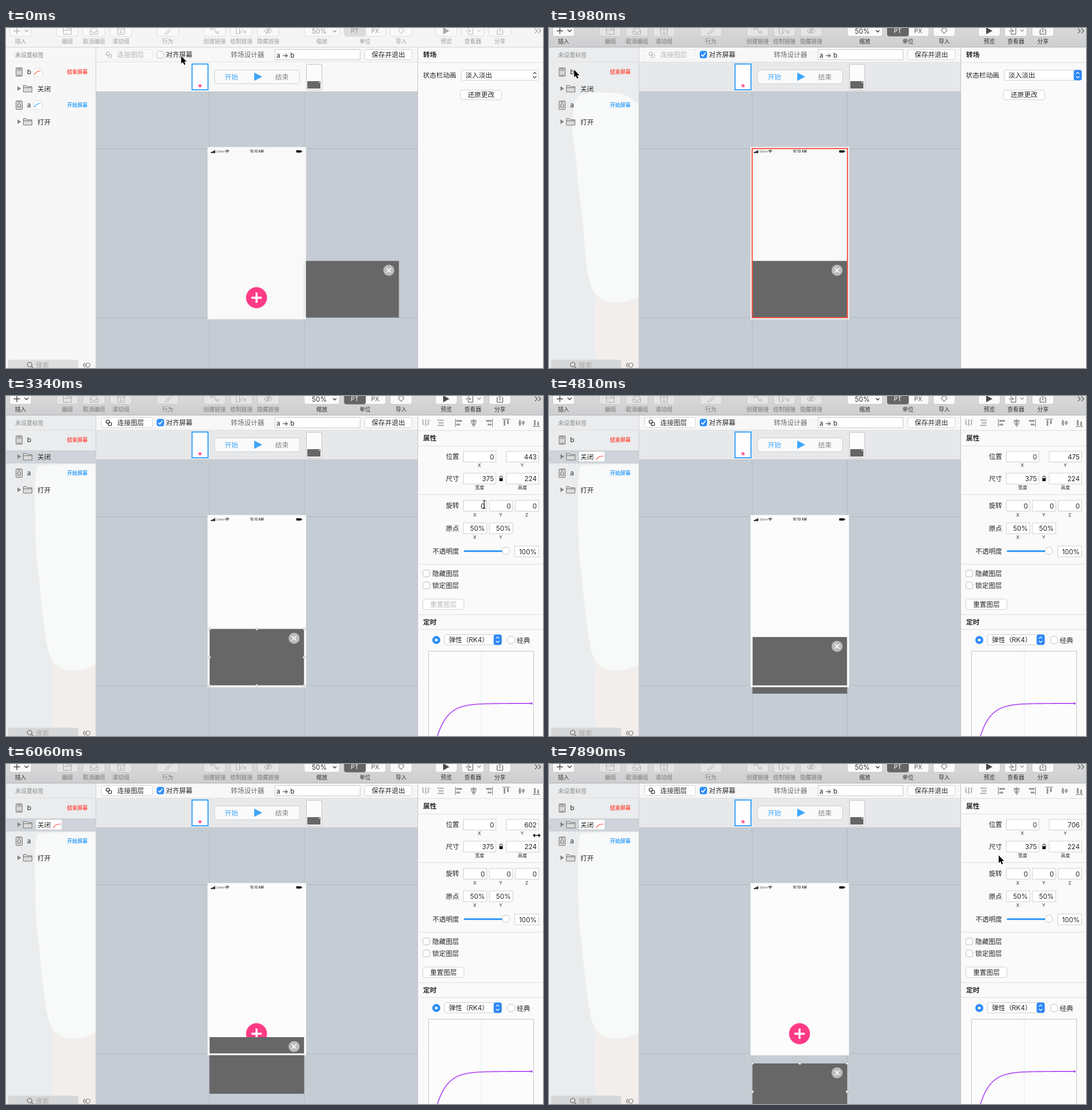
An HTML page with a canvas for the animation above (8 s loop, 941 by 595 pixels).

```html
<!DOCTYPE html>
<html lang="zh-CN">
<head>
<meta charset="utf-8">
<title>转场设计器</title>
<style>
html, body { margin: 0; width: 100%; height: 100%; overflow: hidden; }
canvas { display: block; width: 941px; height: 595px; }
</style>
</head>
<body>
<canvas id="stage" width="941" height="595"></canvas>
<script>
const g = document.getElementById('stage').getContext('2d');
const LOOP = 8000;
const BLUE = '#3ea6fb', RED = '#fb5a4b', PINK = '#ff3b86', PANE = '#676767', INK = '#262626';

// Start, end and number of evenly spaced picture changes
const bursts = [[0, 0, 1], [150, 150, 1], [470, 470, 1], [920, 1830, 7], [1980, 2280, 3],
  [2570, 3340, 6], [3640, 4670, 8], [4810, 5770, 7], [5920, 6860, 7], [7000, 7890, 7]];
const ticks = bursts.flatMap(([a, b, n]) =>
  Array.from({ length: n }, (_, i) => n > 1 ? Math.round(a + (b - a) * i / (n - 1)) : a));

const pointerKeys = [[0, 307, 49], [150, 307, 48], [470, 307, 47.5], [920, 307, 46], [1070, 307, 46],
  [1830, 60, 78], [1980, 44, 73], [2280, 62, 103], [2570, 62, 103], [3340, 838, 190],
  [3640, 838, 190], [4390, 930, 125], [7000, 930, 125], [7890, 788, 160]];
const layerKeys = [[4670, 443], [4810, 475], [5770, 580], [6060, 622], [6860, 706]];

function at(keys, t) {
  const i = keys.findIndex(k => k[0] > t);
  if (i < 0) return keys[keys.length - 1].slice(1);
  if (i === 0) return keys[0].slice(1);
  const a = keys[i - 1], b = keys[i], p = (t - a[0]) / (b[0] - a[0]);
  return a.slice(1).map((v, n) => v + (b[n + 1] - v) * p);
}

function text(s, x, y, size = 11.7, color = INK, align = 'left', weight = 400) {
  g.font = `${weight} ${size}px Inter, "Noto Sans CJK SC", "Noto Sans CJK", sans-serif`;
  g.fillStyle = color;
  g.textAlign = align;
  g.fillText(s, x, y + size * .37);
}
function rect(x, y, w, h, fill) { g.fillStyle = fill; g.fillRect(x, y, w, h); }
function box(x, y, w, h, r, fill, stroke) {
  g.beginPath();
  g.roundRect(x + .5, y + .5, w - 1, h - 1, r);
  if (fill) { g.fillStyle = fill; g.fill(); }
  if (stroke) { g.strokeStyle = stroke; g.lineWidth = 1; g.stroke(); }
}
function disc(x, y, r, fill, stroke) {
  g.beginPath();
  g.arc(x, y, r, 0, 7);
  g.fillStyle = fill; g.fill();
  if (stroke) { g.strokeStyle = stroke; g.lineWidth = 1; g.stroke(); }
}
function path(d, x, y, stroke, width = 1, fill) {
  const p = new Path2D(d);
  g.save();
  g.translate(x, y);
  if (fill) { g.fillStyle = fill; g.fill(p); }
  if (stroke) { g.strokeStyle = stroke; g.lineWidth = width; g.stroke(p); }
  g.restore();
}
function button(label, x, y, w, h, color = INK) {
  box(x, y, w, h, 3.5, '#fff', '#d2d2d2');
  text(label, x + w / 2, y + h / 2, 11.7, color, 'center');
}
function checkbox(x, y, on, pressed) {
  box(x, y, 13, 13, 3, on ? '#2f8ffb' : pressed ? '#e6e6e6' : '#fff', on ? '#2f8ffb' : pressed ? '#9c9c9c' : '#bdbdbd');
  if (on) path('M3 6.5l2.6 3L10 3.4', x, y, '#fff', 1.7);
}
function select(label, x, y, w, on, inset) {
  box(x, y, w, 19, 3.5, '#fff', '#cfcfcf');
  if (on) box(x + w - 15, y, 15, 19, 3.5, '#2b87f8');
  path('M-3 -2l3 -3 3 3M-3 2l3 3 3 -3', x + w - 7.5, y + 9.5, on ? '#fff' : '#444', 1.2);
  text(label, x + inset, y + 9.3);
}
function field(value, x, y, w) {
  box(x, y, w, 20, 0, '#fff', '#d0d0d0');
  text(value, x + w - 4, y + 10.5, 11.7, INK, 'right');
}

const glyphs = {
  plus: 'M-12 0h11M-6.5-5.5v11M7-2l3.5 3.5L14-2',
  folder: 'M-7-6h5l2 2h7V6H-7ZM-7-1H7',
  tray: 'M-7 6V1l3-6h8l3 6v5ZM-7 1h4l1 2h4l1-2h4',
  scroll: 'M-6-6H6V6H-6ZM-6-3H6M-2 2l2 2 2-2M0-1v5',
  wand: 'M-6 6L2-2l2 2-8 8M3-6v2M7-3H5',
  link: 'M-7-4a2 2 0 1 0 4 0a2 2 0 1 0-4 0M-3-4h2c4 0 0 7 4 7M3 3a2 2 0 1 0 4 0a2 2 0 1 0-4 0',
  draw: 'M-9-6h6V5h-6ZM-3 3c5 0 1-5 6-5M4 2a2 2 0 1 0 4 0a2 2 0 1 0-4 0',
  hide: 'M-7 0q7-8 14 0q-7 8-14 0M-2 0a2 2 0 1 0 4 0a2 2 0 1 0-4 0M5-6L-5 6',
  gem: 'M-5-1l3-4h4l3 4-5 6Z',
  viewer: 'M-8-2v-4h8V6h-8V2M-12 0h8M-6-2l2 2-2 2M8-2l3 3 3-3',
  share: 'M-3-2h-2v8H5v-8H3M0 3v-9M-3-4l3-3 3 3'
};

// label, glyph, left edge, width, dimmed
const tools = [['插入', 'plus', 6, 39], ['编组', 'folder', 88, 39, 1], ['取消编组', 'tray', 134, 40, 1],
  ['滚动组', 'scroll', 182, 39, 1], ['行为', 'wand', 264, 39, 1], ['创建链接', 'link', 346, 39, 1],
  ['绘制链接', 'draw', 393, 39, 1], ['隐藏链接', 'hide', 440, 39, 1], ['缩放', '', 522, 63],
  ['单位', '', 592, 74], ['导入', 'gem', 673, 39], ['预览', '', 752, 39], ['查看器', 'viewer', 798, 40],
  ['分享', 'share', 846, 39]];

function toolbar(active) {
  if (active) {
    const shade = g.createLinearGradient(0, 0, 0, 33);
    shade.addColorStop(0, '#d9d9da');
    shade.addColorStop(1, '#cdced0');
    rect(0, 0, 941, 33, shade);
  } else rect(0, 0, 941, 33, '#f5f5f5');
  rect(0, 33, 941, 1, active ? '#b4b4b5' : '#d3d3d3');
  for (const [label, glyph, x, w, dim] of tools) {
    const color = active ? (dim ? '#777' : '#333') : '#9d9d9d';
    const line = active ? (dim ? '#a9a9a9' : '#4a4a4a') : '#b4b4b4';
    box(x, -8, w, 23, 4, active ? (dim ? '#e5e5e6' : '#fafafa') : '#f9f9f9', active ? '#c6c6c6' : '#dedede');
    if (glyph) path(glyphs[glyph], x + w / 2, 5, line, glyph === 'plus' ? 1.4 : 1);
    text(label, x + w / 2, 23, 9.8, color, 'center');
  }
  const ink = active ? '#333' : '#9a9a9a';
  text('50%', 549, 5.5, 11.7, ink, 'center');
  path('M-3-2l3 3 3-3', 576, 6, ink, 1.3);
  box(592, -8, 39, 23, 4, active ? '#656565' : '#dcdcdc');
  text('PT', 611, 5.5, 10.5, active ? '#fff' : '#8c8c8c', 'center');
  text('PX', 647, 5.5, 10.5, active ? '#555' : '#a0a0a0', 'center');
  path('M-5-6L6 0-5 6Z', 771, 5, null, 0, active ? '#4a4a4a' : '#a8a8a8');
  path('M-5-4l4 4-4 4M1-4l4 4-4 4', 932, 5, active ? '#555' : '#999', 1.1);
}

function curveTag(x, y, color) {
  box(x, y, 16, 16, 2, '#fff', '#dcdcdc');
  path('M2 12q2-7 11-7', x, y, color, 1.2);
}
function folderRow(label, y) {
  path('M20 -4l6.5 4-6.5 4Z', 0, y, null, 0, '#858585');
  path('M30.5 6V-5.5h5l1.5 2h8.5V6ZM30.5-1.5h15', 0, y, '#747474', 1, '#dcdcdc');
  text(label, 55, y + .5);
}
function screenRow(name, note, y, color, home) {
  box(17, y - 8, 12, 16, 1.5, '#d5d5d5', '#777');
  path(home ? 'M19.5 0L23-3l3.5 3M20.5 0v3.5h5V0M20-5.5h6' : 'M19-5.5h8M19-3h8M19 5.5h8', 0, y, '#777', 1);
  text(name, 37, y, 11.7, '#444', 'left', 500);
  text(note, 143, y, 9, color, 'right', 700);
}
function sidebar(active, selected, edited) {
  rect(0, 34, 158, 561, active ? '#eaecee' : '#f7f7f7');
  if (active) {
    rect(80, 465, 78, 130, '#f2eeeb');
    path(selected
      ? 'M158 120C130 118 80 120 56 122Q49 130 51 200Q51 290 58 320Q64 400 75 450Q85 478 115 481Q140 481 158 469Z'
      : 'M158 134Q138 116 120 114C90 112 65 112 50 120Q41 130 41 185Q49 230 50 270Q60 330 62 380Q66 430 75 455Q85 478 115 481Q140 480 158 469Z',
      0, 0, null, 0, '#f8f9f9');
  }
  text('未设置标签', 16, 47, 10, '#a9a9a9', 'left', 600);
  rect(0, 59, 158, 1, active ? '#e0e1e3' : '#efefef');
  if (selected) rect(0, 95, 158, 23, '#ced4d9');
  if (edited) {
    box(52, 97, 46, 18, 2, '#fff', '#e2e2e2');
    path('M83 112q2-7 13-7', 0, 0, RED, 1.2);
  }
  screenRow('b', '结束屏幕', 77, RED);
  folderRow('关闭', 106);
  screenRow('a', '开始屏幕', 135, BLUE, true);
  folderRow('打开', 164);
  if (!active) {
    curveTag(48, 70, RED);
    curveTag(48, 127, BLUE);
  }
  box(3, 580, 124, 24, 4, active ? '#d6d7d8' : '#dedede');
  path('M37.5 589a4 4 0 1 0 8 0a4 4 0 1 0-8 0M44.5 592l3.5 4', 0, 0, '#666', 1.2);
  text('搜索', 52, 590, 11.7, '#a9a9a9');
  disc(143.5, 590, 3.7, '#f4f4f4', '#666');
  path('M139 586.5a3.5 3.5 0 1 0 0 7M137 590h4', 0, 0, '#666', 1);
  rect(157, 34, 1, 561, '#cdced0');
}

function controls(t, selected) {
  const checked = t >= 1070;
  rect(158, 34, 563, 26, '#f7f7f8');
  rect(158, 60, 563, 51, checked ? '#e6e8ea' : '#f8f8f8');
  rect(158, 59, 563, 1, '#e2e3e5');
  rect(158, 111, 563, 1, '#c0c3c8');
  box(167, 37, 90, 19, 3.5, selected ? '#fff' : '#f8f8f8', selected ? '#d2d2d2' : '#ececec');
  const ink = selected ? INK : '#b5b5b5';
  path('M175.5 45a3 3 0 1 0 6 0a3 3 0 1 0-6 0M179 49a3 3 0 1 0 6 0a3 3 0 1 0-6 0', 0, 0, ink, 1.2);
  text('连接图层', 195, 46.5, 11.7, ink);
  checkbox(264, 40, checked, t >= 920);
  text('对齐屏幕', 280, 47);
  text('转场设计器', 394, 46.5, 11.7, '#6a6a6a', 'left', 500);
  box(471, 37, 150, 19, 0, '#fff', '#c9c9c9');
  text('a → b', 474, 47.5);
  button('保存并退出', 628, 37, 84, 19);

  box(325, 62, 30, 47, 1, '#fdfdfd');
  g.strokeStyle = BLUE; g.lineWidth = 2;
  g.strokeRect(326, 63, 28, 45);
  disc(340, 101, 2.6, PINK);
  rect(339, 100.5, 2, 1, '#fff');
  box(526, 63, 28, 46, 1, '#fcfcfc', '#bfc1c4');
  rect(528, 93, 23, 13, PANE);
  rect(548, 94, 2, 2, '#ddd');
  box(365, 73, 150, 25, 4, '#fafafa', '#cfd1d3');
  text('开始', 395, 85.5, 11.7, BLUE, 'center');
  path('M435 78L449 85.3 435 92.5Z', 0, 0, null, 0, BLUE);
  text('结束', 483.5, 85.5, 11.7, '#858585', 'center');
}

function workspace(t, selected, layerY) {
  rect(158, 111, 563, 484, '#c6ccd4');
  for (const x of [355.5, 522]) rect(x, 111, 1, 484, '#b4b9c1');
  for (const y of [210.5, 506.5]) rect(158, y, 563, 1, '#b4b9c1');
  const paper = selected ? '#fcfcfc' : '#f9f9f9';
  rect(353.5, 208.5, 172, 301, paper);
  const x = t >= 920 ? 356.5 : 522.5, y = 407.6 + (layerY - 443) * .4427, w = 166, h = 99.1;
  disc(439, 472, 18.4, PINK);
  path('M430 472h18M439 463v18', 0, 0, '#fff', 3.6);
  rect(x, y, w, h, PANE);
  disc(x + 148.3, y + 16.4, 9.7, '#bcbcbc');
  path('M-4-4l8 8M4-4l-8 8', x + 148.3, y + 16.4, '#fff', 1.6);
  g.strokeStyle = paper; g.lineWidth = 3;
  g.strokeRect(355, 210, 169, 298);
  if (t >= 1980 && t < 2280) {
    g.strokeStyle = '#f8594a'; g.lineWidth = 2;
    g.strokeRect(356, 211, 167, 296);
  }
  for (let i = 0; i < 4; i++) rect(359 + i * 2, 217 - i, 1.6, 2 + i, '#111');
  text('Ostrin', 368.5, 216.3, 5.4, '#555');
  path('M384.6 215.3q3.1-2.8 6.2 0M385.9 216.8q1.8-1.6 3.6 0M387.2 218.2h1', 0, 0, '#111', 1.1);
  text('10:10 AM', 439.5, 216.3, 5.6, '#111', 'center', 500);
  box(508, 213.5, 10, 5, 1, '#111');
  rect(518, 215, 1, 2, '#111');
  if (selected && (t < 4810 || t >= 7000))
    for (const i of [0, 1, 2]) for (const j of [0, 1, 2])
      if (i !== 1 || j !== 1) disc(x + i * w / 2, y + j * h / 2, 2, '#fff', '#b0b0b0');
}

function transitionPanel(active) {
  text('转场', 731, 47, 11.7, INK, 'left', 600);
  rect(722, 60, 219, 1, '#dedede');
  text('状态栏动画', 789, 83, 11.7, INK, 'right');
  select('淡入淡出', 797, 73, 137, active, 8);
  button('还原更改', 796, 108, 73, 18);
}

function alignIcons() {
  path('M730.5 41v6q0 3 2 3M735.5 41v12M740.5 41v6q0 3-2 3M756 42.5h11M758 47h9M756 51.5h11', 0, 0, '#aaa', 1.8);
  path('M787.5 40v14M814 47h11M819.5 40v14M852.5 40v14M870 40.5h13M897 47h13M923 53.5h13', 0, 0, '#777', 1);
  const bars = 'M0 43.5h10M0 50h7';
  path(bars, 789, 0, '#999', 3);
  path('M0 43.5h10M2 50h6', 814.5, 0, '#999', 3);
  path('M0 43.5h10M3 50h7', 841, 0, '#999', 3);
  path('M3 42v10M9 42v7', 870.5, 0, '#999', 3);
  path('M3 42v10M9 43.5v7', 897.5, 0, '#999', 3);
  path('M3 42v10M9 45v7', 923.5, 0, '#999', 3);
}
function propertyPanel(layerY, edited) {
  alignIcons();
  for (const y of [60, 87, 172, 294, 382, 408]) rect(722, y, 219, 1, '#dedede');
  text('属性', 731, 74, 11.7, INK, 'left', 600);
  text('定时', 731, 396, 11.7, INK, 'left', 600);
  [['位置', 106], ['尺寸', 145], ['旋转', 192], ['原点', 231.5], ['不透明度', 272]]
    .forEach(([s, y]) => text(s, 794, y, 11.7, INK, 'right'));
  const caption = (s, x, y) => text(s, x, y, 8, INK, 'center');
  field('0', 801, 96, 58);
  field(String(layerY), 876, 96, 58);
  caption('X', 829.5, 121); caption('Y', 904.5, 121);
  field('375', 801, 134.5, 58);
  field('224', 876, 134.5, 58);
  caption('宽度', 830, 160); caption('高度', 905, 160);
  rect(864.5, 144, 6, 5, '#111');
  path('M865.5 144v-2a2 2 0 0 1 4 0v2', 0, 0, '#111', 1);
  ['X', 'Y', 'Z'].forEach((axis, i) => {
    const x = 801 + i * 45.5;
    field('0', x, 182, 42);
    caption(axis, x + 20.5, 208);
    if (i < 2) {
      field('50%', x, 221.5, 42);
      caption(axis, x + 20.5, 247);
    }
  });
  box(802, 270, 75, 3, 1.5, BLUE, '#2f90f5');
  disc(876, 271, 6.5, '#fff', '#c4c4c4');
  field('100%', 891, 262, 43);
  checkbox(730, 304, false);
  text('隐藏图层', 747, 310.5);
  checkbox(730, 325, false);
  text('锁定图层', 747, 331.5);
  button('重置图层', 730, 355, 73, 19, edited ? INK : '#b8b8b8');
  disc(754, 427, 7, '#2b8cfa');
  disc(754, 427, 2.5, '#fff');
  select('弹性（RK4）', 768, 417, 101, true, 8);
  disc(885, 427, 6.8, '#fff', '#c0c0c0');
  text('经典', 895, 427.5);
  box(740, 446, 185, 170, 0, '#fcfcfc', '#c4c4c4');
  rect(832.5, 447, 1, 148, '#d8edfa');
  g.beginPath();
  for (let x = 750; x <= 921; x++) g.lineTo(x, 538 + 57 * Math.exp((756 - x) / 18.7));
  g.strokeStyle = '#b75cf5'; g.lineWidth = 1.9; g.stroke();
  disc(921, 538, 1.9, '#b04ff0');
}

function pointer(t) {
  if (t >= 4670 && t < 5920) return;
  const [x, y] = at(pointerKeys, t);
  if (t >= 3340 && t < 3700) {
    path('M-2.5-7q2.5 0 2.5 2q0-2 2.5-2M0-5v11M-2.5 7q2.5 0 2.5-2q0 2 2.5 2', x, y, '#222', 1.2);
  } else if (t >= 4390 && t <= 7000) {
    const arrows = 'M-7 0l4-3.5v2.7h6v-2.7l4 3.5-4 3.5V.8h-6v2.7Z';
    path(arrows, x, y, '#fff', 1.5, '#111');
    path(arrows, x, y, null, 0, '#111');
  } else {
    const arrow = 'M0 0v13.3l3-2.7 2.2 5 2.3-1-2.2-4.8h4.2Z';
    path(arrow, x, y, '#fff', 1.6, '#000');
    path(arrow, x, y, null, 0, '#000');
  }
}

function draw(now) {
  const time = now % LOOP;
  const t = ticks.filter(k => k <= time).pop();
  const active = t >= 920, selected = t >= 2570, edited = t >= 4810;
  const layerY = Math.round(at(layerKeys, t)[0]);
  workspace(t, selected, layerY);
  controls(t, selected);
  sidebar(active, selected, edited);
  rect(721, 34, 220, 561, '#fafafa');
  rect(721, 34, 1, 561, '#c3c4c6');
  if (selected) propertyPanel(layerY, edited); else transitionPanel(active);
  toolbar(active);
  pointer(t);
}

const start = performance.now();
function loop() {
  draw(performance.now() - start);
  requestAnimationFrame(loop);
}
loop();
</script>
</body>
</html>
```
